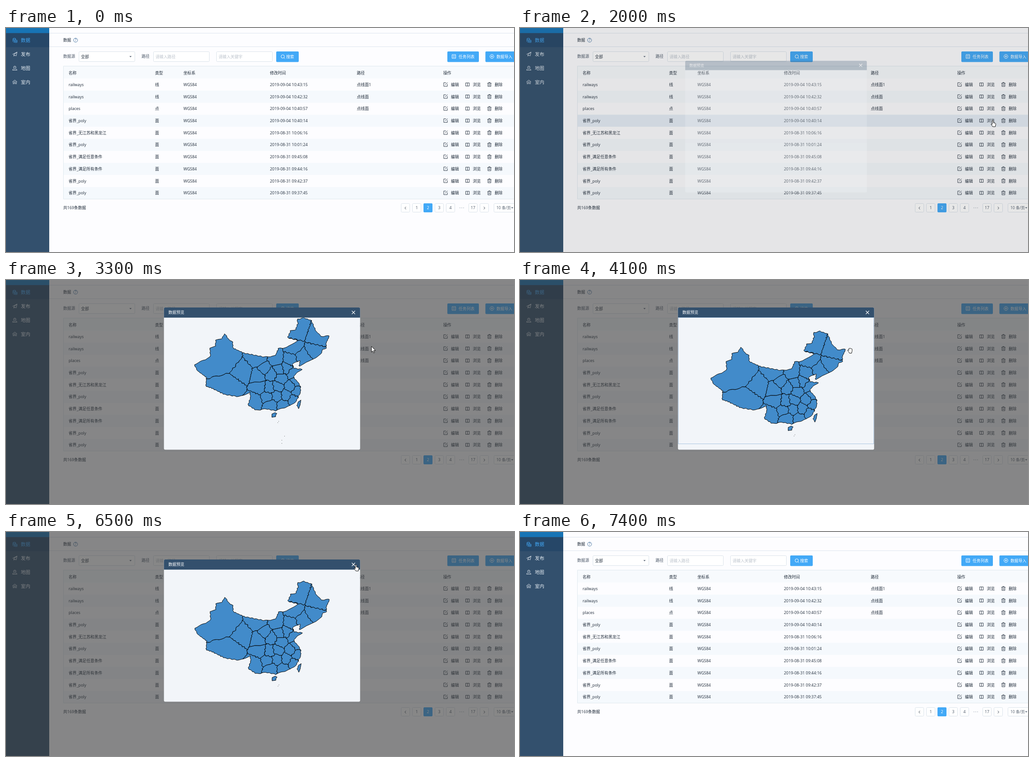
Animation of 1128 by 497 pixels, one loop 7900 ms. Source, as an HTML page:

```html
<!DOCTYPE html>
<html lang="zh-CN">
<head>
<meta charset="utf-8">
<title>数据</title>
<style>
html, body { margin: 0; width: 100%; height: 100%; overflow: hidden; background: #fdfdff; }
svg { display: block; width: 100%; height: 100%; }
text { font: 8.9px "Open Sans", "Noto Sans CJK SC", "Noto Sans CJK", sans-serif; white-space: pre; }
</style>
</head>
<body>
<svg id="stage" viewBox="0 0 1128 497"></svg>
<script>
const INK = '#202c3a', BLUE = '#42a9f7', NAVY = '#33506d', LINE = '#dbe3ea';
const ROW_TOP = 112.3, ROW_HEIGHT = 26.72;

const rect = (x, y, w, h, fill, more = '') =>
  `<rect x="${x}" y="${y}" width="${w}" height="${h}" fill="${fill}" ${more}/>`;
const box = (x, y, w, h) => rect(x + .5, y + .5, w - 1, h - 1, '#fff', `rx="2" stroke="${LINE}"`);
const label = (x, y, s, fill = INK, more = '') =>
  `<text x="${x}" y="${y + 3.2}" fill="${fill}" ${more}>${s}</text>`;
const centered = (x, y, s, fill) => label(x, y, s, fill, 'text-anchor="middle"');
const line = (d, color, width = 1, more = '') =>
  `<path d="${d}" fill="none" stroke="${color}" stroke-width="${width}" ${more}/>`;
const icon = (x, y, d, color = INK, width = .9) =>
  line(d, color, width, `transform="translate(${x} ${y})"`);
const caret = (x, y) => `<path d="M${x - 2.5} ${y - 1.2}h5l-2.5 2.8z" fill="#5b6777"/>`;
const ring = r => `M${-r} 0a${r} ${r} 0 1 1 ${2 * r} 0a${r} ${r} 0 1 1 ${-2 * r} 0`;

const ICONS = {
  data: 'M-4-3a3 1.4 0 0 1 6 0a3 1.4 0 0 1-6 0v6q1 1.4 3 1.4M-4 0q2 1.8 4 1M2-3v2M0 0h5v5h-5zM0 2.5h5',
  send: 'M-5 .5L5-4.5L3 4L-.5 2L-2 4.5V1L5-4.5',
  map: 'M0 2.5q-3.4-3-2.6-5a2.7 2.7 0 0 1 5.2 0q.8 2-2.6 5zM-1-2h2M-3 1.5l-2 3h10l-2-3',
  home: 'M-5-.5L0-4.5L5-.5M-3.5-1v5.5M3.5-1v5.5M-1.5 4.5v-3h3v3M-1.5-1h3',
  edit: 'M1-4h-5v8h8v-5M-1 1L4.5-4.5',
  book: 'M0-3.5h-4v7h4zh4v7h-4',
  trash: 'M-4.5-2.8h9M-1.5-3v-1.5h3v1.5M-3.3-2.8v7.2h6.6v-7.2M-1-.5v3M1-.5v3',
  search: ring(3.7) + 'M2.7 2.7l2.3 2.3',
  list: 'M-4-4h8v8h-8zM-2-1.5h4M-2 1.5h4',
  plus: ring(4.3) + 'M-2.2 0h4.4M0-2.2v4.4',
  left: 'M1.2-2.8l-2.6 2.8l2.6 2.8',
  right: 'M-1.2-2.8l2.6 2.8l-2.6 2.8',
  close: 'M-3.6-3.6l7.2 7.2M3.6-3.6l-7.2 7.2'
};

function sidebar() {
  const items = [['data', '数据'], ['send', '发布'], ['map', '地图'], ['home', '室内']];
  return rect(0, 0, 96, 497, NAVY) + rect(0, 0, 96, 11.5, '#1774b5') + rect(0, 11.5, 96, 31, '#264768') +
    items.map(([name, text], i) => {
      const color = i ? '#e6edf3' : BLUE, y = 27 + 31 * i;
      return icon(19.5, y, ICONS[name], color) + label(33, y + .6, text, color, 'style="font-size:10.4px"');
    }).join('');
}

function toolbar() {
  const button = (x, w, name, textX, text) =>
    rect(x, 52, w, 23.5, BLUE, 'rx="2"') + icon(x + 14.5, 63.2, ICONS[name], '#fff', 1) + label(textX, 63.7, text, '#fff');
  const field = (x, text, color) => box(x, 52, 125, 23) + label(x + 5, 64, text, color);
  return line('M96 11.5h1032M96 41.5h1032', '#dde5ee') +
    label(127, 27, '数据') + icon(154.5, 27, ring(4.5), '#42719f') + centered(154.5, 26.8, '?', '#42719f') +
    label(127, 63, '数据源', '#4c5868') + field(161.5, '全部', INK) + caret(276.5, 63.5) +
    label(301, 63, '路径', '#4c5868') + field(327, '请输入路径', '#bcc3cc') + field(467, '请输入关键字', '#bcc3cc') +
    button(600, 50, 'search', 622, '搜索') +
    button(980, 70, 'list', 1005, '任务列表') +
    button(1064.5, 70, 'plus', 1089, '数据导入');
}

function table() {
  const columns = [139, 331, 394, 586, 779, 971];
  const rows = [
    ['railways', '线', '09-04 10:43:15', '点线面1'],
    ['railways', '线', '09-04 10:42:32', '点线面'],
    ['places', '点', '09-04 10:40:57', '点线面'],
    ['省界_poly', '面', '09-04 10:40:14'],
    ['省界_无江苏和黑龙江', '面', '08-31 10:06:16'],
    ['省界_poly', '面', '08-31 10:01:24'],
    ['省界_满足任意条件', '面', '08-31 09:45:08'],
    ['省界_满足所有条件', '面', '08-31 09:44:16'],
    ['省界_poly', '面', '08-31 09:42:37'],
    ['省界_poly', '面', '08-31 09:37:45']
  ];
  const actions = [['edit', '编辑'], ['book', '浏览'], ['trash', '删除']];
  const stripes = rows.map((_, i) =>
    i % 2 ? rect(127, ROW_TOP + i * ROW_HEIGHT, 1001, ROW_HEIGHT, '#f5f9fd') : '').join('');
  const cells = rows.map(([name, type, time, path = ''], i) => {
    const y = 125.6 + i * ROW_HEIGHT;
    return [name, type, 'WGS84', '2019-' + time, path].map((s, c) => label(columns[c], y, s)).join('') +
      actions.map(([kind, s], k) => icon(976 + 48.7 * k, y - .3, ICONS[kind]) + label(988 + 48.5 * k, y, s)).join('');
  }).join('');
  const head = ['名称', '类型', '坐标系', '修改时间', '路径', '操作']
    .map((s, c) => label(columns[c], 99.5, s, INK, 'font-weight="500"')).join('');
  return rect(127, 85, 1001, 27.3, '#f7fafd') + stripes +
    rect(127, 0, 1001, ROW_HEIGHT, '#e5edf6', 'id="hover"') +
    line('M1128 84.5H127.5V379.5H1128', '#e0e9ef') + head + cells;
}

function pager() {
  const pages = ['left', '1', '2', '3', '4', '•••', '17', 'right'];
  return label(127, 399, '共169条数据') + pages.map((s, i) => {
    const x = 887 + 25 * i;
    if (s === '•••') return [-4, 0, 4].map(d => `<circle cx="${x + d}" cy="399" r=".9" fill="#b9c1ca"/>`).join('');
    if (s === '2') return rect(x - 10, 389, 20, 20, BLUE, 'rx="2"') + centered(x, 398.8, s, '#fff');
    return box(x - 10, 389, 20, 20) + (ICONS[s] ? icon(x, 399.5, ICONS[s]) : centered(x, 398.8, s, '#4c5868'));
  }).join('') + box(1083, 389, 60, 20) +
    label(1089, 399.2, '10 条/页', '#4c5868', 'style="font-size:8.5px"') + caret(1124, 399);
}

const parse = s => s.split(' ').map(p => p.split(',').map(Number));

// Closes the points into an uneven outline; the wobble depends on place only, so neighbours share their edges.
function rough(points, amount) {
  let d = '';
  points.forEach(([ax, ay], i) => {
    const [bx, by] = points[(i + 1) % points.length];
    const n = Math.max(1, Math.round(Math.hypot(bx - ax, by - ay) / 3));
    for (let k = 0; k < n; k++) {
      const x = ax + (bx - ax) * k / n, y = ay + (by - ay) * k / n;
      const dx = amount * Math.sin(.7 * x + 1.3 * y), dy = amount * Math.sin(1.7 * x - .9 * y);
      d += `${d ? 'L' : 'M'}${(x + dx).toFixed(1)} ${(y + dy).toFixed(1)}`;
    }
  });
  return d + 'Z';
}

// The area nearer to one centre than to any other.
function cell(centre, centres) {
  let area = parse('400,70 730,70 730,310 400,310');
  for (const other of centres) {
    if (other === centre) continue;
    const side = p => Math.hypot(p[0] - other[0], p[1] - other[1]) ** 2 - Math.hypot(p[0] - centre[0], p[1] - centre[1]) ** 2;
    area = area.flatMap((p, i) => {
      const q = area[(i + 1) % area.length], a = side(p), b = side(q), f = a / (a - b);
      const kept = a >= 0 ? [p] : [];
      return a * b < 0 ? [...kept, [p[0] + (q[0] - p[0]) * f, p[1] + (q[1] - p[1]) * f]] : kept;
    });
  }
  return area;
}

function regions() {
  const mainland = parse(
    '486,119 494,132 503,137 504,151 528,162 574,171 598,168 605,152 622,150 648,134 625,128 632,113 642,112 648,97 ' +
    '647,87 661,84 678,90 689,114 700,125 718,124 710,142 712,151 703,153 700,164 687,172 667,182 651,192 653,178 ' +
    '635,187 640,196 657,198 638,214 654,235 654,250 643,271 631,279 598,290 578,286 555,289 537,277 543,262 542,250 ' +
    '517,259 485,254 457,240 444,236 445,216 426,202 418,187 443,177 454,170 453,152 465,147 466,134 478,131');
  const islands = ['590,297 596,294 601,296 598,303 591,304', '655,266 653,277 650,286 646,279 649,270'].map(parse);
  const centres = parse(
    '490,175 505,238 528,206 560,176 600,176 638,148 645,115 690,130 684,156 660,172 560,213 575,198 589,208 606,198 ' +
    '630,179 623,194 638,207 611,220 645,226 632,236 604,236 565,238 584,240 580,259 553,268 588,277 615,278 602,257 ' +
    '622,256 638,266 646,247');
  const coast = rough(mainland, .9);
  return `<clipPath id="land"><path d="${coast}"/></clipPath>
    <g stroke="#000" stroke-linejoin="round">
      <path fill="#428bca" d="${coast}${islands.map(p => rough(p, .6)).join('')}"/>
      <path fill="none" stroke-width=".8" clip-path="url(#land)" d="${centres.map(c => rough(cell(c, centres), 1.4)).join('')}"/>
    </g>` + parse('605,313 603,316 618,346 612,355 612,362').map(([x, y]) => rect(x, y, 1, 1, '#444')).join('');
}

function dialog() {
  return `<g id="dialog">${rect(350.7, 61, 435.6, 315.5, '#f2f5f9', 'rx="3"')}
    <path d="M350.7 83.5V64q0-3 3-3h429.6q3 0 3 3v19.5z" fill="${NAVY}"/>
    ${label(360.5, 72, '数据预览', '#fff', 'font-weight="500"')}
    ${icon(771.5, 72, ICONS.close, '#fff', 1.3)}
    <g clip-path="url(#view)"><g id="regions">${regions()}</g></g>
    ${rect(351.5, 83.5, 434, 280, 'none', 'id="focus" stroke="#a9c4e0"')}</g>`;
}

const CURSORS = {
  arrow: 'M0 0v13l3-2.8l2 4.6l2-.9l-2-4.4h4z',
  pointer: 'M-1.3 1q1.3-2 2.6 0v4.6l4 1.2q1.3.5 1.1 2l-1 5.7h-5.6l-3.5-5q-.7-2 1-1.3l1.4 1.2z',
  grab: 'M-3.2 2.5l-2.3-2.8q0-1.6 1.6-1l1 .8v-4q.9-1.6 1.8 0q.8-1.8 1.9-.2q1.2-1 1.8.6q1.6-.6 1.8 1v4l-1.2 4.8h-4.6z'
};

const stage = document.getElementById('stage');
stage.innerHTML = `<clipPath id="view">${rect(351, 83.5, 435, 280.5, '#000')}</clipPath>` +
  rect(0, 0, 1128, 497, '#fdfdff') + sidebar() + toolbar() + table() + pager() +
  rect(0, 0, 1128, 497, '#373737', 'id="mask"') + dialog() +
  '<path id="cursor" fill="#fff" stroke="#111" stroke-linejoin="round"/>';
const [hover, mask, panel, area, focusRing, cursor] =
  ['hover', 'mask', 'dialog', 'regions', 'focus', 'cursor'].map(id => stage.querySelector('#' + id));
const show = (node, on) => node.setAttribute('visibility', on ? 'inherit' : 'hidden');

const DRAG_START = 3600, DRAG_END = 4300;

function ease(t, from, to) {
  const f = Math.min(1, Math.max(0, (t - from) / (to - from)));
  return f * f * (3 - 2 * f);
}

// Each move eases from wherever the cursor is to its own end point.
function pointerAt(t) {
  let x = 1128, y = 24;
  const move = (from, to, endX, endY) => {
    const f = ease(t, from, to);
    x += (endX - x) * f;
    y += (endY - y) * f;
  };
  move(350, 1250, 1050, 204.5);
  move(2900, 3500, 728, 127);
  move(DRAG_START, 4100, 733, 156.7);
  move(4100, DRAG_END, 728.5, 152.6);
  move(4350, 4500, 758.5, 99);
  move(4600, 5450, 777, 84);
  move(6200, 6500, 777, 72);
  move(7100, 7300, 822, 74);
  return [x, y];
}

function cursorKind(t, x) {
  if (t < 1000 || t >= 7200) return 'arrow';
  if (t < 3000 || t >= 6300) return 'pointer';
  return x > 786 ? 'arrow' : 'grab';
}

function draw(now) {
  const t = Math.floor(now % 7900 / 100) * 100;
  const [x, y] = pointerAt(t);
  const row = Math.floor((y - ROW_TOP) / ROW_HEIGHT);
  const shown = ease(t, 1900, 2200) - ease(t, 6700, 6900);
  const dimmed = ease(t, 1900, 2250) - ease(t, 6700, 7000);
  const [grabX, grabY] = pointerAt(DRAG_START);
  const [dragX, dragY] = pointerAt(Math.min(DRAG_END, Math.max(DRAG_START, t)));

  show(hover, t >= 500 && t < 2200 && row >= 0);
  hover.setAttribute('y', ROW_TOP + row * ROW_HEIGHT);
  mask.setAttribute('opacity', .6 * dimmed);
  panel.setAttribute('opacity', shown);
  panel.setAttribute('transform', `translate(568.5 218.5) scale(${.9 + .1 * shown}) translate(-568.5 -218.5)`);
  show(area, t >= 2200);
  area.setAttribute('transform', `translate(${dragX - grabX} ${dragY - grabY})`);
  show(focusRing, t > DRAG_START && t < 5500);
  show(cursor, t >= 500 && t < 7400);
  cursor.setAttribute('d', CURSORS[cursorKind(t, x)]);
  cursor.setAttribute('transform', `translate(${x} ${y})`);
  requestAnimationFrame(() => draw(performance.now() - start));
}
const start = performance.now();
draw(0);
</script>
</body>
</html>
```
